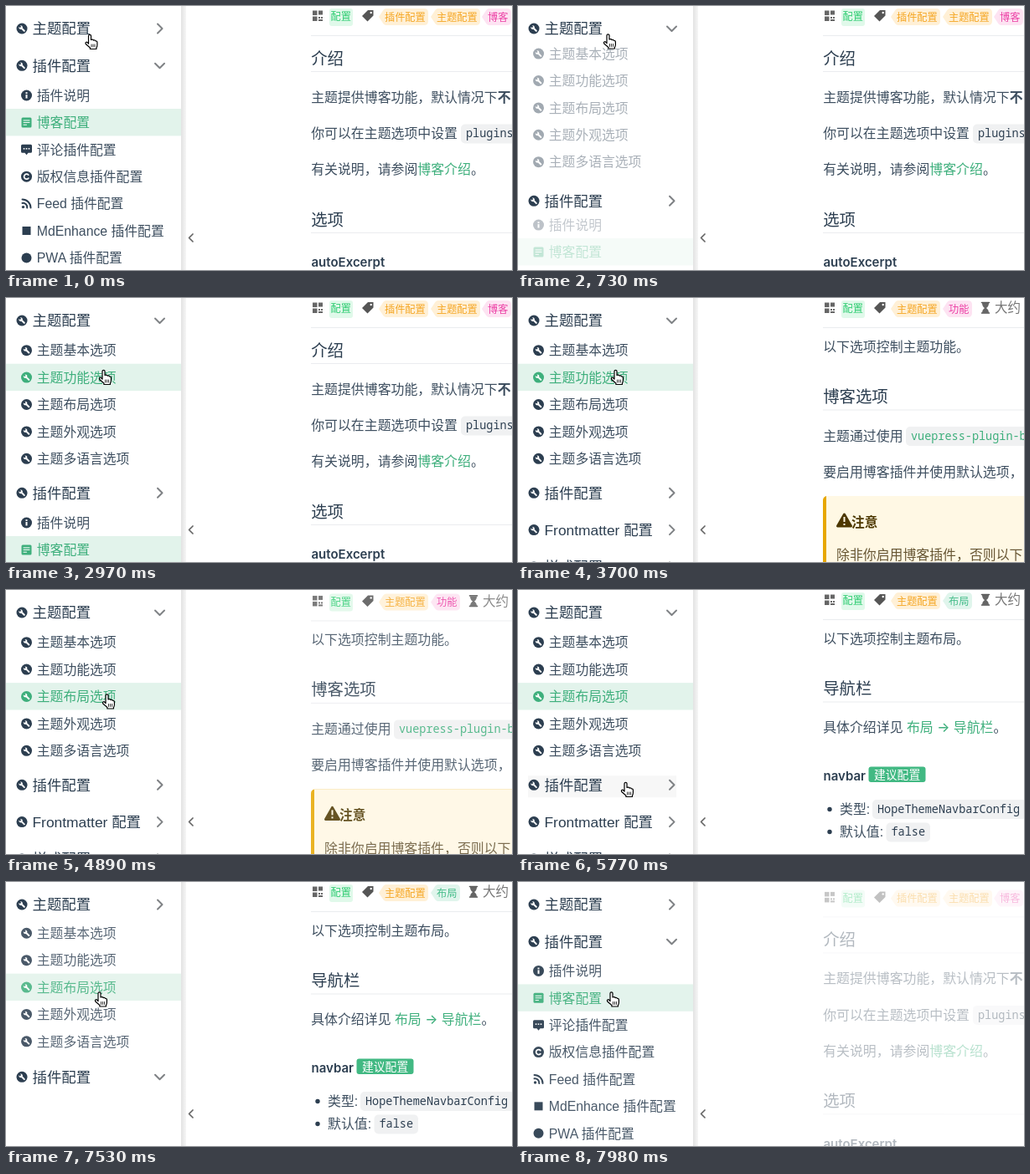
An HTML page that plays this animation: 604 px wide and 316 px high, repeating every 8000 ms.

```html
<!DOCTYPE html>
<html lang="zh-CN">
<head>
<meta charset="utf-8">
<style>
html, body { margin: 0; width: 100%; height: 100%; overflow: hidden; background: #fff; }
svg { display: block; font-family: "Liberation Sans", "Noto Sans CJK SC", "Noto Sans CJK", sans-serif; }
.mono { font-family: "Noto Sans Mono", "Noto Sans CJK SC", monospace; }
.inter { font-family: Inter, sans-serif; }
</style>
</head>
<body>
<svg id="stage" width="604" height="316" viewBox="0 0 604 316"></svg>
<script>
const INK = '#2c3e50', BODY = '#3d4e5f', GREEN = '#3eaf7c';
const LOOP = 8000, TICK = 147.78;

// y is the vertical middle of the line
const text = (x, y, str, size = 15.9, fill = BODY, more = '') =>
  `<text x="${x}" y="${y + size * .365}" font-size="${size}" fill="${fill}" ${more}>${str}</text>`;
const rect = (x, y, w, h, fill, r = 0) =>
  `<rect x="${x}" y="${y}" width="${w}" height="${h}" rx="${r}" fill="${fill}"/>`;
const path = (d, fill, more = '') => `<path d="${d}" fill="${fill}" ${more}/>`;
const line = (d, color, width = 1.5) =>
  path(d, 'none', `stroke="${color}" stroke-width="${width}" stroke-linecap="round" stroke-linejoin="round"`);
const group = (x, y, body, alpha = 1) =>
  `<g transform="translate(${x} ${y})" opacity="${alpha}">${body}</g>`;
const disc = (r, c) => `<circle r="${r}" fill="${c}"/>`;

// Icons are centred on 0,0
const icons = {
  wrench: c => disc(6.5, c) + line('M-.5-.5L2.8 2.8', '#fff', 2) +
    path('M1-1.6A2.8 2.8 0 0 0-2-3.7L-.9-2.2-2.2-.9-3.7-2A2.8 2.8 0 0 0-1 1z', '#fff'),
  info: c => disc(6.5, c) + rect(-1, -1, 2, 4.5, '#fff') + rect(-1, -3.8, 2, 1.8, '#fff'),
  blog: c => rect(-6, -6, 12, 12, c, 1.5) + line('M-3.5-2.5H3.5M-3.5 0H3.5M-3.5 2.8H0', '#fff', 1),
  comment: c => path('M-5-6H5Q6.5-6 6.5-4.5V2.5Q6.5 4 5 4H2L0 6.5-2 4H-5Q-6.5 4-6.5 2.5V-4.5Q-6.5-6-5-6z', c) +
    [-3, 0, 3].map(x => rect(x - .8, -1.8, 1.6, 1.6, '#fff')).join(''),
  copyright: c => disc(6.5, c) + line('M2.3-2A3 3 0 1 0 2.3 2', '#fff', 1.7),
  feed: c => `<circle cx="-4" cy="4" r="1.7" fill="${c}"/>` + line('M-5-.7A5 5 0 0 1 .7 5M-5-5A10 10 0 0 1 5 5', c, 2),
  square: c => rect(-5, -5, 10, 10, c),
  dot: c => disc(6, c),
};

const themeItems = ['基本', '功能', '布局', '外观', '多语言'].map(s => ['wrench', `主题${s}选项`]);
const pluginItems = [
  ['info', '插件说明'], ['blog', '博客配置'], ['comment', '评论插件配置'], ['copyright', '版权信息插件配置'],
  ['feed', 'Feed 插件配置'], ['square', 'MdEnhance 插件配置'], ['dot', 'PWA 插件配置'],
];

const header = (y, title, open) =>
  group(19, y, icons.wrench(INK)) + text(31.5, y, title, 17.4, INK) +
  group(183.5, y, line(open ? 'M-5.5-2.5L0 3 5.5-2.5' : 'M-2.5-5.5L3 0-2.5 5.5', '#7f8285', 2));

const list = (y, items, active, alpha) => group(0, y + 35.7 - 10 * (1 - alpha), items.map(([icon, label], i) => {
  const on = i === active, at = i * 32.4;
  return (on ? rect(0, at - 16.4, 209, 32.4, '#e2f3eb') : '') +
    group(24.5, at, icons[icon](on ? GREEN : INK)) + text(36.8, at, label, 15.8, on ? GREEN : BODY);
}).join(''), alpha);

const enter = k => k >= 4 ? 1 : Math.max(.001, 1 - (1 - k / 4) ** 2);
const leave = k => k >= 1.6 ? 0 : (1 + Math.cos(Math.PI * k / 1.6)) / 2;

function sidebar(n) {
  const theme = n < 4 ? 0 : n < 41 ? enter(n - 4) : n < 51 ? leave(n - 41) : leave(n - 50.6);
  const plugin = n < 4 ? 1 : n < 20 ? leave(n - 4) : n < 41 ? leave(n - 20) : n < 51 ? enter(n - 41) : enter(n - 51);
  const themeOpen = n >= 4 && n < 41;
  const y = theme ? 233.3 : 71.3;
  let out = rect(0, 0, 209, 316, '#fff') + header(27, '主题配置', themeOpen);
  if (theme) out += list(27, themeItems, n < 20 ? -1 : n < 32 ? 1 : 2, theme);
  if (n >= 38 && n < 44) out += rect(12, y - 11, 177, 26, '#f7f7f7');
  out += header(y, '插件配置', !themeOpen);
  if (plugin) out += list(y, pluginItems, n < 32 || n >= 51 ? 1 : -1, plugin);
  else out += header(y + 44.3, 'Frontmatter 配置') + header(y + 88.6, '样式配置');
  return out + rect(209, 0, 6, 316, 'url(#shade)') + line('M223 273L218.5 277.5 223 282', '#666', 1.7);
}

const rule = y => rect(364, y, 240, 1, '#eaecef');
const h2 = (y, str) => text(364.2, y, str, 19.4, INK, 'font-weight="500"') + rule(y + 15.5);
const h3 = (y, str) => text(364.5, y, str, 15, INK, 'class="inter" font-weight="600"');
const link = str => `<tspan fill="${GREEN}" font-weight="500">${str}</tspan>`;
const code = (x, y, w, str, color = INK) =>
  rect(x, y - 11, w, 23, '#f0f1f2', 5) + text(x + 6, y, str, 13.5, color, 'class="mono"');

const tagColors = { orange: ['#fff0d6', '#f5a623'], pink: ['#fde3f2', '#ec3fa5'], teal: ['#e0f5ec', '#46bd8a'] };
function tag(x, str, tone) {
  const [bg, fg] = tagColors[tone], w = str.length * 12 + 11;
  return path(`M${x + 9} 3H${x + w - 5}q5 0 5 5v10q0 5-5 5H${x + 9}q-3 0-5-4l-4-6 4-6q2-4 5-4z`, bg) +
    text(x + 7, 13.5, str, 12.2, fg);
}

const metaRow = rect(366, 5.5, 5.5, 5.5, '#666') + rect(373, 5.5, 5, 5, '#666') + rect(366, 12.5, 5.5, 5.5, '#666') +
  rect(373, 13, 2, 2, '#666') + rect(376, 13, 2, 2, '#666') + rect(373, 16, 5, 2, '#666') +
  rect(386, 3, 28, 21, '#e0f9ea', 3) + text(387.5, 13, '配置', 12.2, '#2ecc71') +
  path('M432 5H438.5V11.5L431.5 18.5 425 12z', '#555') + '<circle cx="435.7" cy="8" r="1.2" fill="#fff"/>' + rule(35);

const guideTop = (str, tone) => metaRow + tag(445, '主题配置', 'orange') + tag(507, str, tone) +
  line('M553.5 5.5H562.5M553.5 18H562.5', '#555', 1.6) +
  path('M554 6H562Q562 10 559 12 562 14 562 18H554Q554 14 557 12 554 10 554 6z', '#666') +
  text(569, 11.6, '大约', 15.5, '#777') + text(364.2, 58, `以下选项控制主题${str}。`);

const warnSign = 'M389.5 259L381.5 273H397.5z';

const pages = {
  blog: metaRow + tag(445, '插件配置', 'orange') + tag(507, '主题配置', 'orange') + tag(568, '博客', 'pink') +
    h2(62.5, '介绍') +
    text(364.2, 109, '主题提供博客功能，默认情况下<tspan font-weight="700">不</tspan>') +
    text(364.2, 152.5, '你可以在主题选项中设置') + code(543, 152.5, 90, 'plugins') +
    text(364.2, 195.5, `有关说明，请参阅${link('博客介绍')}。`) +
    h2(255.5, '选项') + h3(306.8, 'autoExcerpt'),

  feature: guideTop('功能', 'pink') + h2(118, '博客选项') +
    text(364.2, 165, '主题通过使用') + code(463, 165, 170, 'vuepress-plugin-blog2', GREEN) +
    text(364.2, 208, '要启用博客插件并使用默认选项，') +
    rect(364, 237, 260, 100, '#e7a700', 5) + rect(368, 237, 260, 100, '#fff8e4') +
    line(warnSign, '#4d3800', 3) + path(warnSign, '#4d3800') +
    rect(388.5, 262, 2, 6, '#fff8e4') + rect(388.5, 270, 2, 2, '#fff8e4') +
    text(398, 268, '注意', 15.7, '#4d3800', 'font-weight="700"') +
    text(380, 307.5, '除非你启用博客插件，否则以下', 15.9, '#665533'),

  layout: guideTop('布局', 'teal') + h2(118, '导航栏') +
    text(364.2, 164.5, `具体介绍详见 ${link('布局 <tspan class="inter">→</tspan> 导航栏')}。`) +
    h3(222.5, 'navbar') +
    rect(418.5, 211.5, 68, 18.5, '#42b983', 3) + text(425, 220.7, '建议配置', 13.8, '#fff', 'font-weight="500"') +
    group(372, 262.5, disc(2.7, INK)) + text(384, 262, '类型:') + code(423, 262, 184, 'HopeThemeNavbarConfig') +
    group(372, 289.5, disc(2.7, INK)) + text(384, 289, '默认值:') + code(439.5, 289.5, 52.5, 'false'),
};

// Old page sinks and fades out, new page rises and fades in
const fade = [1, .86, .4, .36, .94];
const visits = [[-9, 'blog'], [20, 'feature'], [32, 'layout'], [51, 'blog']];
function page(n) {
  const i = visits.filter(v => v[0] <= n).length - 1;
  const k = n - visits[i][0], alpha = fade[k] ?? 1;
  return group(0, 10 * (1 - alpha), pages[visits[k < 3 ? i - 1 : i][1]], alpha);
}

// Pointer stops: tick, x, y
const track = [
  [0, 94.5, 33.5], [2, 102, 33], [6, 102, 33], [10, 111, 85.5], [27, 111, 85.5], [30, 115, 124],
  [36, 115, 124], [39, 123, 229.5], [44, 123, 229.5], [47, 106, 131], [55, 106, 131],
];
function cursor(n) {
  const i = track.findIndex(p => p[0] > n), [a, x, y] = track[i - 1], [b, u, v] = track[i];
  const f = (n - a) / (b - a);
  return group(x + (u - x) * f, y + (v - y) * f,
    path('M4 10V2.3a1.5 1.5 0 0 1 3 0V7q2.5-1 3 .6q2-.6 2.4.8q2-.2 2 1.6v3q0 2-1 3.5v1.5h-7.5v-1.5L1 12.3q-1.3-2 .4-2.6q1-.3 2.6 2z',
      '#fff', 'stroke="#000" stroke-width="1.2" stroke-linejoin="round"') +
    line('M7.5 12.5V15.5M9.5 12.5V15.5M11.5 12.5V15.5', '#000', .8));
}

const defs = '<linearGradient id="shade"><stop stop-color="#e2e2e2"/><stop offset="1" stop-color="#f6f6f6"/></linearGradient>';
const stage = document.getElementById('stage');
const start = performance.now();
let shown = -1;
function frame() {
  const n = Math.floor(((performance.now() - start) % LOOP + 8) / TICK);
  if (n !== shown) {
    shown = n;
    stage.innerHTML = defs + page(n) + sidebar(n) + cursor(n);
  }
  requestAnimationFrame(frame);
}
frame();
</script>
</body>
</html>
```
